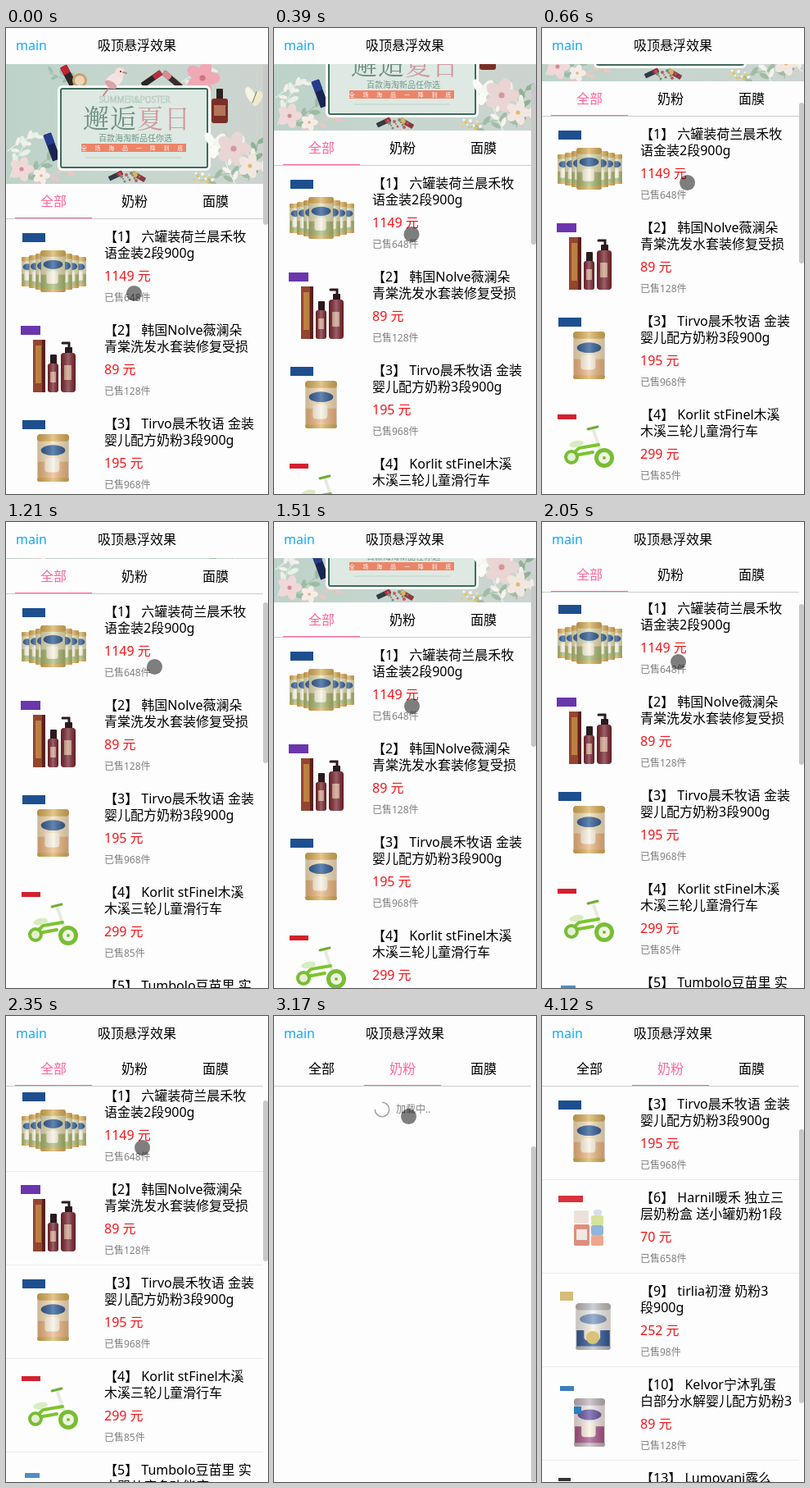
These frames come from a looping animation (320 px wide and 568 px high, 4520 ms). An HTML page:

```html
<!DOCTYPE html>
<html lang="zh-CN">
<head>
<meta charset="utf-8">
<title>吸顶悬浮效果</title>
<style>
html, body { margin: 0; width: 100%; height: 100%; overflow: hidden; background: #fdfdfd; }
body { position: relative; color: #000; font: 16px/20px "Noto Sans", "Noto Sans CJK SC", sans-serif; white-space: nowrap; }
body > *, #page > *, .row, .row > *, #load > * { position: absolute; }
#page { left: 0; top: 0; width: 320px; }
#banner { left: 0; top: 44px; width: 320px; height: 146px; }
#list { left: 0; top: 0; width: 320px; }
header { left: 0; top: 0; width: 320px; height: 44px; line-height: 43px; text-align: center; background: #fdfdfd; }
header span { position: absolute; left: 12px; color: #14a8f2; }
#tabs { left: 0; width: 314px; height: 42px; background: #fdfdfd; border-bottom: 1px solid #ccc; }
#tabs div { position: absolute; top: 0; width: 94px; height: 41px; line-height: 42px; text-align: center; border-bottom: 1px solid transparent; }
#tabs .on { color: #ff6599; border-color: #ff6599; }
.row { left: 0; width: 314px; height: 113px; border-bottom: 1px solid transparent; }
.resting .row { border-color: #ebebeb; }
.row svg { left: 0; top: 0; }
.row div { left: 120px; }
.name { top: 11px; }
.price { top: 59px; color: #f5161b; }
.sold { top: 86px; font-size: 12px; color: #808080; }
#load { left: 0; top: 0; font-size: 12px; color: #808080; }
#load svg { left: 121px; top: 103px; }
#load span { left: 149px; top: 104px; }
#bar { right: 0; width: 6px; border-radius: 3px; background: #c8c8c8; }
#dot { left: -9.5px; top: -9.5px; width: 19px; height: 19px; border-radius: 50%; background: rgba(0, 0, 0, .5); }
</style>
</head>
<body>
<div id="page">
  <svg id="banner" viewBox="0 44 320 146"></svg>
  <div id="list"></div>
</div>
<div id="load">
  <svg width="22" height="22"><circle id="ring" cx="11" cy="11" r="8.7" fill="none" stroke="#a2a2a2" stroke-width="1.5" stroke-dasharray="41 14"/></svg>
  <span>加载中..</span>
</div>
<div id="tabs"><div>全部</div><div>奶粉</div><div>面膜</div></div>
<header><span>main</span>吸顶悬浮效果</header>
<div id="bar"></div>
<div id="dot"></div>
<script>
const $ = id => document.getElementById(id);

// SVG helpers
const rect = (x, y, w, h, fill, r = 0, more = '') =>
  `<rect x="${x}" y="${y}" width="${w}" height="${h}" rx="${r}" fill="${fill}" ${more}/>`;
const oval = (x, y, rx, ry, fill, turn = 0) =>
  `<ellipse cx="${x}" cy="${y}" rx="${rx}" ry="${ry}" fill="${fill}" transform="rotate(${turn} ${x} ${y})"/>`;
const disc = (x, y, r, fill) => oval(x, y, r, r, fill);
const line = (d, color, w) =>
  `<path d="${d}" fill="none" stroke="${color}" stroke-width="${w}" stroke-linecap="round"/>`;
const label = (x, y, size, fill, text, more = '') =>
  `<text x="${x}" y="${y}" font-size="${size}" fill="${fill}" ${more}>${text}</text>`;
const gradient = (id, ...colors) => `<linearGradient id="${id}">` +
  colors.map((c, i) => `<stop offset="${i / (colors.length - 1)}" stop-color="${c}"/>`).join('') + '</linearGradient>';
const stick = (x, y, w, h, cap, body, turn) =>
  `<g transform="rotate(${turn} ${x} ${y})">${rect(x - w / 2, y - h / 2, w, h, body, 1)}${rect(x - w / 2, y - h / 2, w, h * .4, cap, 2)}</g>`;
const flower = (x, y, r, fill, core) => [0, 72, 144, 216, 288].map(a => {
  const t = a * Math.PI / 180;
  return oval(x + r * .6 * Math.cos(t), y + r * .6 * Math.sin(t), r * .6, r * .42, fill, a);
}).join('') + disc(x, y, r * .2, core);
const sprig = (x, y, turn, size, fill) => {
  let leaves = line(`M0 0Q${size / 2} -4 ${size} 0`, fill, 1);
  for (let i = 1; i < 6; i++) {
    const side = i % 2 ? 1 : -1;
    leaves += oval(size * i / 5, side * 4, size / 8, size / 18, fill, side * 40);
  }
  return `<g transform="translate(${x} ${y}) rotate(${turn})">${leaves}</g>`;
};
const can = (x, y, w, h, lid, body, badge, foot) =>
  rect(x + w * .03, y + h * .04, w * .94, h * .94, body, w * .08) +
  rect(x + w * .03, y + h * .58, w * .94, h * .36, foot) +
  oval(x + w / 2, y + h * .34, w * .38, h * .11, badge) +
  rect(x + w * .24, y + h * .5, w * .46, h * .3, '#f6efdf', w * .1) +
  rect(x, y, w, h * .15, lid, w * .1) +
  rect(x, y + h * .92, w, h * .08, lid, w * .08) +
  rect(x, y, w, h, 'url(#sheen)', w * .1);

const gold = '#d6ae58', blue = '#1d4f8f', wine = '#711d2c';

const pictures = {
  1: rect(20, 17, 28, 11, blue) +
    [[19, 46, 14, 36], [84, 46, 14, 36], [28, 44, 16, 40], [73, 44, 16, 40], [36, 42, 17, 44], [64, 42, 17, 44], [42, 38, 31, 51]]
      .map(c => can(...c, gold, '#dfe0ba', blue, '#a3b872')).join(''),
  2: rect(18, 16, 24, 11, '#6b36ad') +
    rect(33, 33, 15, 64, '#94452f') + rect(44, 33, 4, 64, '#5c2020') + rect(36, 40, 7, 46, '#bd8040') +
    rect(54, 51, 8, 12, '#2a1a1c', 1) + rect(51, 62, 13, 35, wine, 3) + rect(54, 72, 7, 13, '#c99a86') +
    line('M69 37H77V44', '#2a1a1c', 3) + rect(72, 42, 9, 8, '#2a1a1c', 1) +
    rect(67, 49, 18, 48, wine, 4) + rect(71, 64, 9, 18, '#c99a86') +
    rect(51, 62, 13, 35, 'url(#sheen)', 3) + rect(67, 49, 18, 48, 'url(#sheen)', 4),
  3: rect(20, 17, 28, 11, blue) + can(38, 34, 39, 58, gold, '#f2e0bb', blue, '#eab583'),
  4: rect(19, 21, 23, 6, '#d4202e') +
    line('M63 41L74 73', '#e9e9e2', 4) + line('M56 39L68 36', '#6fae35', 3) +
    line('M36 71L45 62L69 58M40 71L62 67', '#7cc52e', 4) + oval(42, 57, 9, 4, '#d9ecc0', -12) +
    disc(36, 73, 9, '#78bd35') + disc(36, 73, 5, '#e4efd2') +
    disc(76, 74, 12, '#78bd35') + disc(76, 74, 7, '#eef4e3') + disc(76, 74, 2, '#78bd35'),
  5: rect(23, 25, 18, 6, '#4f8fc4') + rect(30, 48, 58, 38, '#d8b98a', 2),
  6: rect(20, 19, 30, 8, '#d8323c') +
    rect(39, 37, 18, 16, '#ece2dc', 2) + rect(39, 54, 19, 26, '#dd8f7d', 2) + rect(42, 60, 13, 13, '#f2e7e4') +
    rect(63, 36, 10, 7, '#d9dde4', 3) + rect(60, 43, 15, 12, '#d6e39b', 2) +
    rect(60, 55, 15, 12, '#8fb6dc', 2) + rect(60, 67, 15, 13, '#efa68f', 2),
  9: rect(22, 22, 16, 11, '#d3bd78') + can(41, 36, 43, 57, '#b9bcc1', '#eef0f3', '#6f8fc0', '#24539c') + disc(62, 78, 8, '#d9c375'),
  10: rect(22, 23, 17, 6, '#3c7fbe') + can(39, 38, 38, 59, '#b9b4bd', '#eee9ef', '#5c4a9c', '#a14f8c') + rect(39, 48, 9, 9, '#2a7fc0'),
  13: rect(20, 21, 15, 4, '#333') + rect(40, 40, 36, 50, '#9cc98a', 8),
};

const goods = {
  1: ['六罐装荷兰晨禾牧<br>语金装2段900g', 1149, 648],
  2: ['韩国Nolve薇澜朵<br>青棠洗发水套装修复受损', 89, 128],
  3: ['Tirvo晨禾牧语 金装<br>婴儿配方奶粉3段900g', 195, 968],
  4: ['Korlit stFinel木溪<br>木溪三轮儿童滑行车', 299, 85],
  5: ['Tumbolo豆苗里 实<br>木婴儿床多功能床', 699, 76],
  6: ['Harnil暖禾 独立三<br>层奶粉盒 送小罐奶粉1段', 70, 658],
  9: ['tirlia初澄 奶粉3<br>段900g', 252, 98],
  10: ['Kelvor宁沐乳蛋<br>白部分水解婴儿配方奶粉3', 89, 128],
  13: ['Lumovani露么<br>硅胶奶瓶', 128, 215],
};
const row = (id, i) => {
  const [name, price, sold] = goods[id];
  return `<div class="row" style="top:${233 + i * 114}px"><svg width="114" height="113">${pictures[id]}</svg>
    <div class="name">【${id}】 ${name}</div><div class="price">${price} 元</div><div class="sold">已售${sold}件</div></div>`;
};
const listAll = [1, 2, 3, 4, 5].map(row).join('');
const listMilk = [3, 6, 9, 10, 13].map(row).join('');

const headline = 'font-family="Noto Serif CJK SC, Noto Sans CJK SC, serif" font-weight="500" letter-spacing="1"';
const centered = 'text-anchor="middle"';
let art = gradient('sage', '#bdd2c9', '#c6d6ce', '#cdd3cf') +
  gradient('sheen', 'rgba(60,30,0,.22)', 'rgba(255,255,255,.3)', 'rgba(60,30,0,.22)') +
  rect(0, 44, 320, 146, 'url(#sage)');
[[5, 182, -65, 58, '#e8efe6'], [22, 186, -40, 55, '#9dbba5'], [2, 150, -30, 42, '#f2f0ea'], [30, 190, -20, 50, '#e3c9c8'],
 [296, 186, -75, 52, '#8fb295'], [318, 178, -130, 50, '#edf2e9'], [240, 186, -12, 52, '#a0bda5'], [280, 190, -110, 48, '#f4f3ec'],
 [88, 64, 195, 36, '#a2bfae'], [214, 66, -25, 42, '#e8efe6']]
  .forEach(s => art += sprig(...s));
// cosmetics around the frame
art += stick(76, 58, 9, 26, '#c22432', '#2e2528', -28) + disc(90, 64, 9, '#c9a368') + disc(90, 64, 6, '#ecd6bb') +
  stick(56, 145, 10, 34, '#253b8c', '#1b2450', -20) +
  stick(178, 62, 7, 28, '#b62f3d', '#2b2527', 55) + stick(203, 63, 7, 28, '#d98b93', '#3a2c2c', -50) +
  flower(240, 61, 18, '#efa9b4', '#d8727f') +
  rect(257, 74, 8, 13, '#2b2120', 1) + rect(251, 86, 20, 30, '#7a2f26', 3) + rect(254, 94, 14, 13, '#b5735a') +
  rect(63, 70, 187, 104, '#fbfdfb', 6) + rect(67, 74, 179, 96, '#dde9e2', 2, 'stroke="#3f6a5c" stroke-width="2"') +
  oval(132, 64, 12, 8, '#f3e4e2', -35) + oval(128, 69, 8, 4, '#dba2a8', 30) + disc(139, 54, 6, '#f5dfdd') +
  line('M143 54l4 1M125 74l-6 8', '#c98389', 2) + disc(140, 53, 1, '#333') +
  oval(250, 137, 5, 11, '#fafbf6', -35) + oval(260, 139, 6, 12, '#f4f6f0', 35) + oval(254, 151, 5, 8, '#fafbf6', 10) +
  flower(278, 147, 18, '#e8d5d4', '#d79798') + flower(298, 168, 13, '#f2e7e0', '#e2ba72') +
  flower(19, 172, 13, '#efd8d8', '#d18f93') + flower(43, 180, 9, '#f6ece7', '#dfb86f') +
  oval(299, 82, 5, 11, '#f6f4e2', -28) + oval(307, 86, 5, 10, '#eeeacb', 28) + line('M301 91L306 78', '#77735a', 1) +
  label(157, 91, 10, '#f7faf7', 'SUMMER&amp;POSTER', centered + ' stroke="#8fab9f" stroke-width=".4"') +
  label(94, 122, 32, '#6f8e84', '邂逅', headline) + label(160, 122, 32, '#d0999d', '夏日', headline) +
  label(113, 138, 10, '#71948a', '百款海淘新品任你选') +
  rect(92, 141, 128, 10, '#ec8468') +
  label(156, 148.5, 7, '#fff', '全 场 海 品 一 降 到 底', centered + ' letter-spacing="4"') +
  line('M98 158H214', '#c0d0c5', 1) +
  stick(134, 180, 6, 18, '#a7333d', '#333b46', 65) + stick(162, 181, 6, 18, '#d8b466', '#883a40', -60);
for (let i = 0; i < 26; i++) {
  const x = 74 + i * 89 % 180, y = 177 + i * 37 % 11;
  art += disc(x, y, 1 + i % 3 * .5, ['#e6c45f', '#c8575c', '#f7f6ee', '#6e9179'][i % 4]);
}
$('banner').innerHTML = art;

// Picture steps, and the gesture as [time, ...values]
const LOOP = 4520;
const ticks = [0, 120, 240, 390, 520, 660, 790, 940, 1070, 1210, 1360, 1510, 1630, 1750, 1900, 2050, 2200, 2350,
  2630, 2750, 2870, 3020, 3170, 3290, 3440, 3570, 3720, 3850, 3970, 4120];
const scrollPath = [[0, 0], [120, 5], [660, 125], [940, 171], [1070, 167], [1210, 145], [1510, 92], [1630, 87],
  [1750, 93], [2050, 149], [2200, 156], [2350, 157]];
const touchPath = [[0, 156, 323], [120, 158, 314], [660, 177, 188], [940, 183, 146], [1070, 183, 150], [1210, 181, 176],
  [1510, 168, 224], [1630, 166, 228], [1750, 167, 219], [2050, 166, 170], [2350, 166, 160], [2630, 164, 142],
  [2870, 156, 67], [3020, 157, 80], [3170, 164, 122], [3290, 168, 159], [3570, 187, 226], [3970, 295, 521]];

function along(path, t) {
  const i = path.findIndex(p => p[0] > t);
  if (i < 0) return path[path.length - 1].slice(1);
  const a = path[i - 1], b = path[i], k = (t - a[0]) / (b[0] - a[0]);
  return a.slice(1).map((v, j) => v + (b[j + 1] - v) * k);
}

const STICK = 147, VIEW = 524;
const tabs = [...$('tabs').children];
tabs.forEach((tab, i) => tab.style.left = 11 + 99 * i + 'px');
let shown;

function draw(t) {
  const milk = t >= 3020, loading = milk && t < 3440;
  const scroll = milk ? STICK : Math.round(along(scrollPath, t)[0]);
  const total = loading ? 671 : milk ? 822 : 1401;
  const html = loading ? '' : milk ? listMilk : listAll;
  if (html !== shown) $('list').innerHTML = shown = html;
  $('list').className = t >= 2350 ? 'resting' : '';
  $('page').style.transform = `translateY(${-scroll}px)`;
  $('tabs').style.top = 190 - Math.min(scroll, STICK) + 'px';
  tabs.forEach((tab, i) => tab.className = i === +milk ? 'on' : '');
  $('load').style.display = loading ? '' : 'none';
  $('ring').setAttribute('transform', `rotate(${-90 + (t - 3170) * .36} 11 11)`);
  $('bar').style.top = 44 + scroll * VIEW / total + 'px';
  $('bar').style.height = VIEW * VIEW / total + 'px';
  const [x, y] = along(touchPath, t);
  $('dot').style.transform = `translate(${x}px, ${y}px)`;
  $('dot').style.display = t < 4120 ? '' : 'none';
}

const start = performance.now();
function frame() {
  const t = Math.max(0, performance.now() - start) % LOOP;
  draw(ticks.filter(k => k <= t).pop());
  requestAnimationFrame(frame);
}
frame();
</script>
</body>
</html>
```
